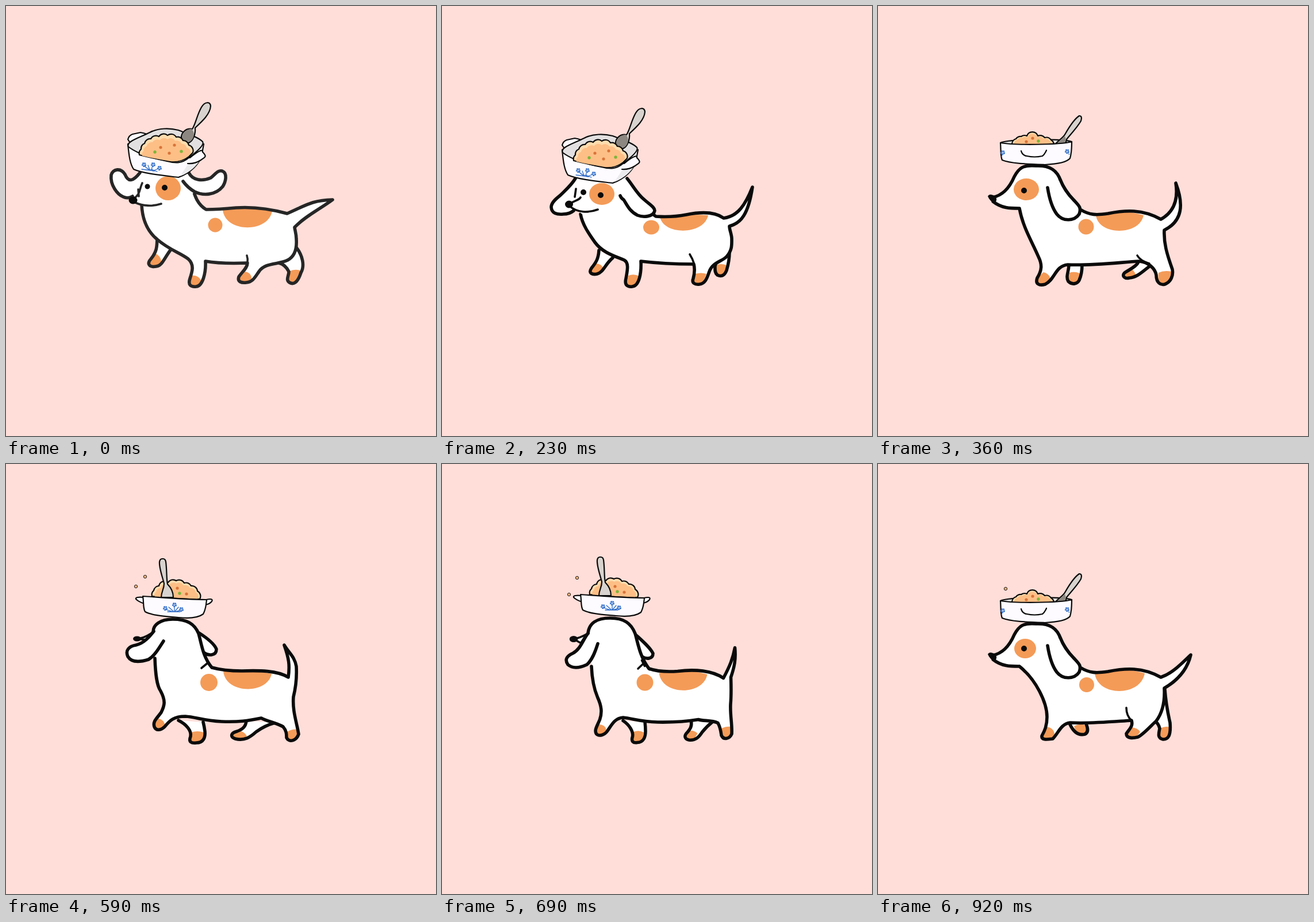
An HTML page that plays this animation: 748x748 px, repeating every 1050 ms.

```html
<!DOCTYPE html>
<html lang="en">
<head>
<meta charset="utf-8">
<title>Walking dog with a dish</title>
<style>
html, body { margin: 0; width: 100%; height: 100%; overflow: hidden; background: #ffded9; }
svg { display: block; width: 100%; height: 100%; }
path { stroke-linecap: round; stroke-linejoin: round; }
.skin { fill: #fff; }
.coat { fill: #f49b58; }
.ink { fill: #0b0b0b; }
.line { fill: none; stroke: #0b0b0b; stroke-width: 5.6; }
.fine { stroke-width: 3.6; }
#stage > g:first-child .line { stroke: #262626; }
.dish { fill: #fdfbff; stroke: #0b0b0b; stroke-width: 2.2; }
.inside { fill: #e2e0e0; }
.shade { fill: #ebebee; }
.spoon { fill: #d8d3ce; }
.dull { fill: #8c8780; }
.rice { fill: #ffdcae; }
.core { fill: #fdbf86; }
.blue { fill: none; stroke: #2f6cc6; stroke-width: 1.3; }
.petals { fill: #dbe8ff; stroke: #2f6cc6; stroke-width: 3; stroke-dasharray: 2.2 .8; }
.carrot { fill: #d9743a; }
.pea { fill: #7db53a; }
.crumb { fill: #eeb07a; stroke: #222; stroke-width: 1; }
</style>
</head>
<body>
<svg viewBox="0 0 748 748"><defs id="dishes"></defs><g id="stage"></g></svg>
<script>
const path = (cls, d) => `<path class="${cls}" d="${d}"/>`;
const dot = (cls, x, y, r) => `<circle class="${cls}" cx="${x}" cy="${y}" r="${r}"/>`;
const oval = (x, y, rx, ry = rx) =>
  `M${x - rx} ${y}a${rx} ${ry} 0 1 0 ${2 * rx} 0a${rx} ${ry} 0 1 0 ${-2 * rx} 0Z`;
const saddle = (x1, y1, x2, y2, low, high) => {
  const c = y1 + (low - y1) * 1.33;
  return `M${x1} ${y1}C${x1 + 5} ${c} ${x2 - 7} ${c} ${x2} ${y2}Q425 ${2 * high - (y1 + y2) / 2} ${x1} ${y1}Z`;
};
// white shape, orange markings, then the outline on top
const shape = (d, marks = '') => path('skin', d) + path('coat', marks) + path('line', d);
// in-between pose: mixes every number of two drawings with equal structure
const blend = (a, b, t) => {
  const to = b.match(/-?\d+(\.\d+)?/g);
  let i = 0;
  return a.replace(/-?\d+(\.\d+)?/g, n => +(+n + (to[i++] - n) * t).toFixed(2));
};

// ---- dishes ----
const flower = (x, y) => dot('petals', x, y, 2.5);
const mound = (points, end, cx, base) => {
  const d = 'M' + points.map(p => p.join(' ')).join('A10 10 0 0 1 ') + end;
  return path('dish rice', d) +
    `<g transform="translate(${cx} ${base}) scale(.9 .84) translate(${-cx} ${-base})">${path('core', d)}</g>`;
};
const bits = (carrots, peas) =>
  carrots.map(p => dot('carrot', ...p, 2.6)).join('') + peas.map(p => dot('pea', ...p, 2.7)).join('');

const dishes = {
  front:
    path('dish', 'M216 238L212 232Q214 225 220 223L234 220Q240 221 245 223Z') +
    path('dish', 'M212 240C214 262 216 275 222 284C240 292 275 295 300 298C322 290 335 275 340 262L344 240Z') +
    path('shade', 'M316 276L303 296C321 289 332 277 337 269Z') +
    path('dish inside', 'M213 245C208 236 230 230 250 220C265 212 285 212 300 216C315 222 335 228 342 236C346 242 330 255 318 264C306 274 296 274 280 270C255 265 230 258 213 245Z') +
    path('dish spoon', 'M324 214C330 205 332 190 340 176C346 166 355 166 356 174C355 188 342 200 329 212C330 222 326 234 318 238L306 234C302 222 312 212 324 214Z') +
    path('dull', 'M306 234C304 222 314 213 323 214C330 222 326 232 320 236Z') +
    mound([[232, 259], [235, 249], [241, 239], [252, 231], [266, 227], [281, 225], [296, 228], [308, 234], [318, 242], [325, 255]],
      'L318 262Q304 273 285 270Q255 265 232 259Z', 280, 268) +
    bits([[269, 246], [284, 256], [293, 242]], [[259, 254], [305, 253]]) +
    path('dish', 'M320 264C333 253 343 248 342 254C351 263 345 263 339 268Q328 275 316 274') +
    path('blue', 'M240 277Q247 286 258 287M256 276Q252 282 255 287M267 282L255 287M236 284L252 286M263 288L252 284M247 277L250 285') +
    flower(240, 276) + flower(256, 276) + flower(267, 282),
  side:
    path('dish inside', 'M213 238C225 232 320 230 337 236C325 243 230 243 213 238Z') +
    path('dish spoon', 'M308 241C315 232 322 230 326 222C334 208 344 195 350 191Q356 191 353 200C346 212 336 222 328 232L326 240Z') +
    path('dull', 'M310 240Q320 232 325 226L327 232L324 240Z') +
    mound([[233, 241], [240, 231], [249, 227], [259, 226], [278, 226], [290, 229], [301, 233], [306, 241]], 'Z', 270, 241) +
    bits([[258, 236], [269, 230]], [[279, 235]]) +
    path('dish', 'M213 238C214 252 213 262 216 268C230 274 262 275 290 276C312 275 328 272 334 265C337 255 337 245 337 236C315 242 235 242 213 238Z') +
    path('dish', 'M249 252Q251 260 259 261Q272 264 286 261Q290 258 293 251') +
    flower(217, 255) + flower(329, 253) + path('blue', 'M331 257L333 258M216 259L215 262'),
  back:
    mound([[254, 230], [257, 220], [266, 212], [282, 206], [296, 203], [310, 207], [322, 212], [333, 221], [337, 235]], 'Z', 300, 234) +
    bits([[298, 216], [314, 226]], [[302, 225]]) +
    path('dish spoon', 'M270 232C270 222 275 218 275 208C272 196 266 180 267 170C268 163 277 163 278 170C280 185 279 200 281 209C286 214 291 222 291 232Z') +
    path('dish', 'M240 232C230 231 225 232 226 235Q231 240 241 243M348 236C357 234 360 235 358 239Q354 244 346 245') +
    path('dish', 'M238 230C240 242 238 250 242 257C255 264 280 265 300 267C320 269 335 267 343 261C348 252 348 244 349 236C310 236 270 232 238 230Z') +
    path('blue', 'M277 253L291 257M293 248V257M305 254L294 257M283 249L291 256M300 249L294 256M281 257H303') +
    flower(277, 251) + flower(293, 245) + flower(305, 253)
};
const dish = (id, x, y) => `<use href="#${id}" x="${x}" y="${y}"/>`;
const crumb = (x, y) => dot('crumb', x, y, 2.7);

// ---- dog poses ----
const legs = p => shape(p.legA, p.pawA) + shape(p.legB, p.pawB);

const facing = p => legs(p) + shape(p.body, p.marks) + path('skin', p.head) +
  shape(p.earL) + shape(p.earR) + path('coat', p.eyePatch) +
  path('line fine', p.face) + path('line fine', p.crease) + path('ink', p.dots);

const earsUp = facing({
  legA: 'M263 400C263 420 262 428 252 440C244 449 250 455 261 453C272 452 274 440 288 422',
  pawA: 'M258 430Q270 434 270 446L262 452L250 450L249 443Z',
  legB: 'M505 420C516 434 520 452 513 464C507 482 500 485 493 481C486 476 492 470 492 462Q486 450 475 447',
  pawB: 'M492 462Q503 456 514 461L506 478L497 481L490 476Z',
  body: 'M236 345C237 372 246 392 263 406C285 425 303 429 317 440C328 450 324 462 320 474C316 486 322 489 331 488C342 487 348 465 347 444C370 448 395 448 420 447C420 456 410 463 405 471C402 480 410 482 418 481C430 480 434 470 440 462C450 446 475 450 490 442C505 434 506 418 505 405C505 397 503 392 502 385C520 366 545 354 568 337C530 338 520 348 489 361C460 353 430 349 400 351C380 353 365 354 348 354C332 344 328 328 325 318',
  marks: 'M324 469Q334 467 341 480L336 487L322 487L319 478Z' + 'M416 462Q427 464 427 474L420 480L408 480L406 472Z' +
    oval(364, 381, 12.5) + saddle(377, 355, 463, 357, 385, 351),
  head: 'M230 290L318 288L326 325L300 346L240 349L214 333Z',
  earL: 'M233 290C222 304 213 308 207 293C200 281 186 283 183 294C181 312 194 328 204 332Q212 336 220 331',
  earR: 'M318 290C325 304 342 305 356 299C364 293 368 285 376 287C386 291 382 306 377 314C364 330 342 330 328 323Q316 316 308 305',
  eyePatch: oval(282, 317, 22, 21),
  face: 'M225 342C238 348 255 349 270 344M222 335C234 328 232 318 237 308M230 319L231 331',
  crease: 'M419 434Q421 440 420 446',
  dots: oval(221, 338, 7.5, 6.5) + oval(246, 314, 4.5) + oval(276, 316, 5)
});

const earsDown = facing({
  legA: 'M273 425C272 440 268 446 260 456C254 465 262 468 270 466C281 463 283 450 297 438',
  pawA: 'M264 448Q276 446 282 458L272 465L262 465L260 459Z',
  legB: 'M500 428C500 440 498 450 495 460C491 470 485 471 479 468C474 464 475 458 475 452Q477 448 478 440',
  pawB: 'M476 451Q486 447 495 451L491 466L483 470L476 465Z',
  body: 'M241 362C244 380 256 397 266 411C279 429 300 435 317 442C326 447 322 462 320 474C317 486 323 489 331 488C343 487 347 465 346 444C370 447 405 449 438 449C440 457 440 463 437 474C434 482 440 485 448 484C459 483 462 470 465 462C470 446 488 444 495 436C505 425 504 415 504 405C504 397 500 390 500 383C520 378 533 362 540 315C528 345 515 366 490 369C475 358 450 358 425 363C405 367 388 367 372 366C352 352 335 330 322 305',
  marks: 'M324 469Q334 465 343 470L340 482L330 488L321 484Z' + 'M440 466Q451 463 460 466L455 479L446 484L437 478Z' +
    oval(364, 385, 14, 12.5) + saddle(379, 366, 463, 364, 391, 363),
  head: 'M230 300L322 298L330 350L300 365L244 362L220 345Z',
  earL: 'M232 300C225 312 213 322 205 330C196 337 190 343 190 350C191 361 200 363 211 362Q222 362 229 356',
  earR: 'M322 300C332 312 340 328 352 337C362 346 370 350 370 356C368 367 350 368 340 364C326 357 322 346 316 337Q312 335 310 330',
  eyePatch: oval(278, 327, 22, 19),
  face: 'M222 348C235 360 255 360 271 354M222 344C232 338 238 338 241 333M233 318L231 332',
  crease: 'M431 432Q436 440 438 447',
  dots: oval(221, 345, 7, 6.5) + oval(246, 324, 5) + oval(276, 329, 5)
});

const sideHead = 'C380 364 368 364 352 354C338 335 325 322 318 305C312 285 298 277 275 278C252 276 245 282 237 297C228 318 215 330 199 333L200 340C215 352 230 352 246 352';
const profile = p => legs(p) + shape(p.body + sideHead, p.marks) +
  shape('M295 316C298 335 302 350 311 362C322 376 342 374 350 362C354 350 350 348 340 337C328 325 322 315 317 302') +
  path('line fine', p.crease) +
  path('ink', oval(254, 321, 5) + 'M191 331Q194 325 204 331Q209 338 203 342Q195 341 191 331Z');

const sideLow = profile({
  legA: 'M332 450C332 462 326 471 331 479C338 486 347 483 350 477Q355 466 355 450',
  pawA: 'M333 464Q342 461 351 465L348 478L340 482L331 478Z',
  legB: 'M452 447C448 454 438 458 429 464C423 470 430 475 437 473C452 472 462 460 476 450',
  pawB: 'M437 457Q446 458 448 468L432 473L427 467Z',
  body: 'M246 352C252 385 268 410 279 436C286 450 285 460 277 473C273 484 281 487 291 484C308 476 308 452 330 450C370 452 420 446 455 444C470 446 482 456 484 468C484 482 492 486 499 484C510 480 514 468 512 458C502 430 497 412 498 390C530 374 532 345 518 308C523 340 512 360 492 371C460 353 430 355 400 361',
  marks: 'M288 463Q298 466 300 474L290 485L278 483L278 472Z' + 'M488 464Q498 459 511 462L509 476L497 485L487 478Z' +
    oval(258, 319, 22, 19) + oval(362, 384, 13.5) + saddle(379, 364, 462, 364, 391, 358),
  crease: 'M451 434Q456 443 472 448'
});

const sideStep = profile({
  legA: 'M334 453C342 470 352 472 360 470Q368 466 362 452',
  pawA: 'M341 456Q352 450 362 455L365 464L358 470L344 466Z',
  legB: 'M499 392C501 420 504 432 508 450C510 474 504 479 496 479C486 477 488 470 490 460Q488 452 483 448',
  pawB: 'M491 460Q499 455 508 458L506 473L496 479L489 472Z',
  body: 'M246 352C275 375 294 415 294 440C294 455 290 464 285 473C284 481 295 479 304 478C314 468 318 452 334 450C370 452 410 448 441 446C444 456 438 460 432 469C432 478 444 477 452 475C462 470 475 455 484 447C497 430 499 410 498 390C522 376 538 358 544 332C525 350 512 364 492 371C460 353 430 355 400 361',
  marks: 'M293 457Q306 459 307 470L302 478L287 478L287 470Z' + 'M441 458Q452 459 456 466L450 474L436 474L433 469Z' +
    oval(256, 321, 19, 17) + oval(363, 384, 13) + saddle(377, 364, 464, 364, 395, 358),
  crease: 'M432 424Q432 438 441 446'
});

const away = p => legs(p) + shape(p.earR) + path('skin', p.muzzle) + path('line fine', p.muzzle) + path('ink', p.nose) +
  shape(p.body, p.marks) + shape(p.earL) + path('line fine', p.crease);

const backSwing = away({
  legA: 'M300 446C314 453 323 464 321 474C317 484 323 486 331 485C344 485 347 475 346 465Q345 457 343 449',
  pawA: 'M322 467Q333 463 344 467L343 479L332 485L321 481Z',
  legB: 'M418 447C417 458 410 462 402 465C390 468 390 475 399 478C415 482 425 475 435 466Q450 455 468 450',
  pawB: 'M399 465Q412 462 419 473L412 479L401 479L393 472Z',
  body: 'M259 338C260 365 262 385 269 395C278 412 276 420 270 432C262 443 255 448 258 457C261 465 270 463 276 457C285 446 292 439 312 439C330 440 345 447 375 448C405 449 420 447 444 442C455 448 470 450 482 457C488 464 488 470 488 476C492 485 505 482 509 470C506 450 498 430 500 405C505 385 506 370 505 352C502 335 493 330 484 315C492 338 494 350 491 371C472 359 440 359 410 360C390 360 372 358 358 354C342 335 340 312 335 295C328 278 315 270 290 270C268 270 256 280 256 292',
  marks: 'M265 443Q275 444 277 456L270 461L260 461L258 453Z' + 'M489 466Q498 460 508 462L507 473L498 481L489 478Z' +
    oval(353, 380, 15) + saddle(378, 361, 462, 365, 391, 360),
  earL: 'M274 308C265 322 258 334 248 340C232 345 218 345 212 335C207 324 214 317 226 315C240 312 250 300 257 291',
  earR: 'M336 294C350 303 362 312 366 322C366 334 352 334 344 328Q338 322 337 312',
  muzzle: 'M228 304Q240 303 252 295L244 306Z',
  nose: oval(228, 304, 7, 4.5),
  crease: 'M340 355L351 346M347 335L351 345M351 346L358 355'
});

const backRest = away({
  legA: 'M330 447C338 455 343 466 342 474C340 482 343 485 348 484C357 484 361 474 362 465Q363 457 363 449',
  pawA: 'M344 465Q352 461 358 467L356 478L348 484L342 479Z',
  legB: 'M449 448C453 455 453 460 452 468C450 478 455 482 460 482C467 481 469 475 470 467Q472 457 472 448',
  pawB: 'M453 465Q462 461 470 464L467 476L460 482L453 476Z',
  body: 'M261 366C262 385 268 400 272 416C278 432 281 445 279 457C277 470 274 478 279 482C285 484 296 480 300 471C306 460 310 445 318 443C335 446 345 449 375 450C405 450 430 449 448 447C455 447 468 440 478 444C481 454 482 460 484 468C488 477 496 474 499 469C504 455 504 445 504 430C502 415 500 405 500 390C515 372 530 350 535 324C520 338 508 352 488 374C470 360 440 354 410 361C390 364 375 363 362 358C346 335 342 312 337 295C330 276 318 266 295 266C270 266 255 275 252 297',
  marks: 'M282 463Q294 463 296 472L292 480L280 482L278 474Z' + 'M483 454Q491 451 502 452L498 468L490 473L484 467Z' +
    oval(353, 380, 14) + saddle(377, 366, 461, 367, 396, 359),
  earL: 'M268 317C267 335 264 348 256 358C246 365 236 367 226 363C218 355 222 350 230 343C242 332 240 312 251 298',
  earR: 'M340 302C350 315 363 328 368 337C368 346 358 345 352 342Q344 338 342 328',
  muzzle: 'M230 305Q240 302 251 297L239 317Z',
  nose: oval(230, 305, 7.5, 6.5),
  crease: 'M342 357L350 348M348 348L354 358M355 347L364 360'
});

// ---- timeline: [end in ms, picture] ----
const timeline = [
  [130, earsUp + dish('front', 0, 0)],
  [230, blend(earsUp, earsDown, .5) + dish('front', -1.5, 5)],
  [360, earsDown + dish('front', -3, 10)],
  [460, sideLow + dish('side', 0, 0)],
  [590, blend(backSwing, backRest, .3) + dish('back', 2, -5) + crumb(252, 191)],
  [690, backSwing + dish('back', 0, 0) + crumb(242, 196) + crumb(226, 213)],
  [820, blend(backSwing, backRest, .5) + dish('back', 3, -3) + crumb(235, 198) + crumb(221, 227)],
  [920, backRest + dish('back', 5.5, -5) + crumb(227, 203) + crumb(217, 241)],
  [1050, sideStep + dish('side', 0, 0) + crumb(222, 217)]
];

document.getElementById('dishes').innerHTML =
  Object.entries(dishes).map(([id, art]) => `<g id="${id}">${art}</g>`).join('');
const stage = document.getElementById('stage');
stage.innerHTML = timeline.map(([, art]) => `<g>${art}</g>`).join('');

function draw() {
  const t = performance.now() % 1050;
  const now = timeline.findIndex(([end]) => t < end);
  [...stage.children].forEach((g, i) => g.style.display = i === now ? '' : 'none');
  requestAnimationFrame(draw);
}
draw();
</script>
</body>
</html>
```
